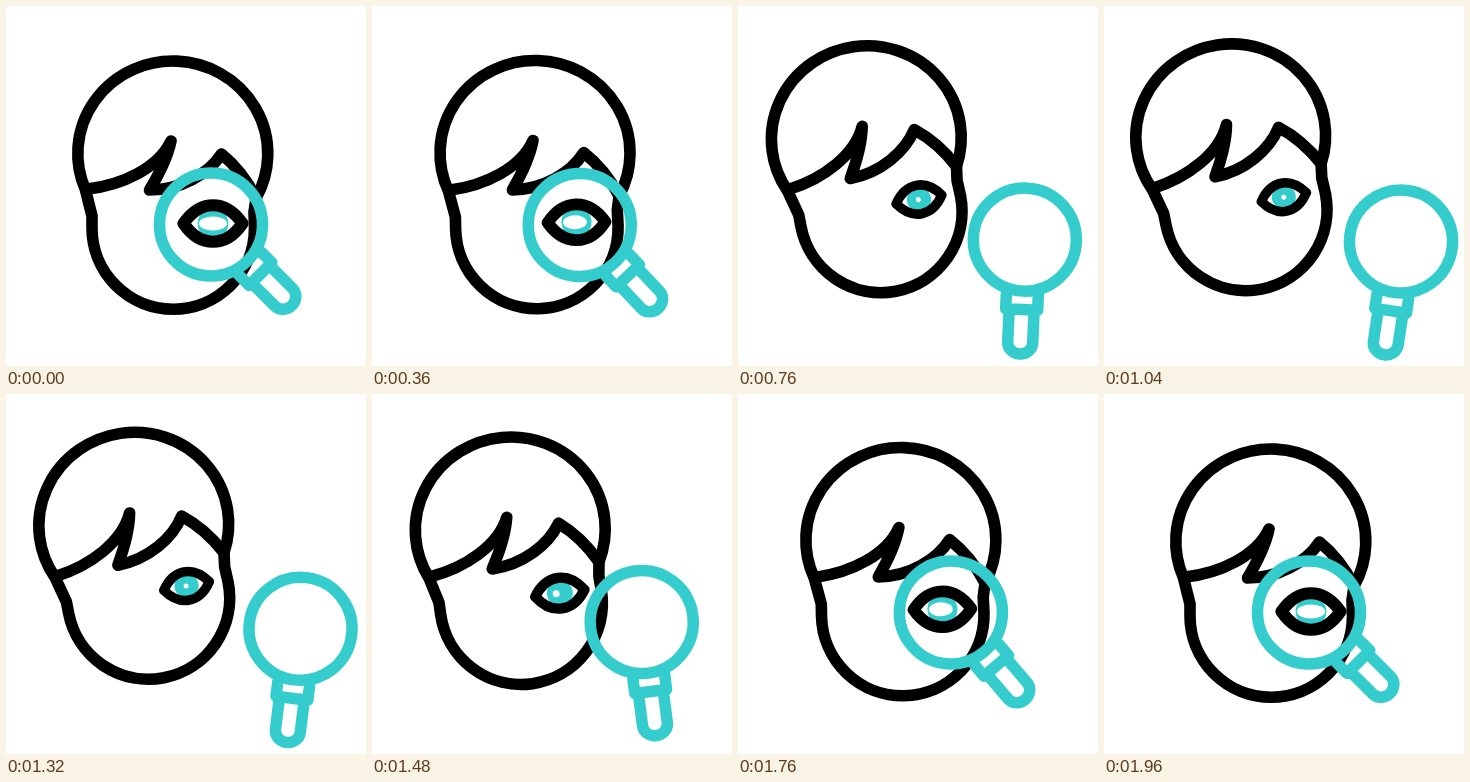
An HTML page for the animation above (2 s loop, 360 by 360 pixels).

```html
<!DOCTYPE html>
<html lang="en">
<head>
<meta charset="utf-8">
<title>Eye examination</title>
<style>
  html, body { margin: 0; height: 100%; overflow: hidden; background: #fff; }
  svg { display: block; width: 100vw; height: 100vh; fill: none; stroke-linecap: round; stroke-linejoin: round; }
  #head { stroke: #000; stroke-width: 11.6; }
  #lens { stroke: #34cccc; stroke-width: 11.5; }
</style>
</head>
<body>
<svg viewBox="0 0 360 360">
  <defs>
    <path id="lids" d="M-23 0C-10-19 10-19 23 0C10 19-10 19-23 0Z"/>
    <clipPath id="opening"><use href="#lids"/></clipPath>
  </defs>
  <g id="head">
    <path d="M-87 36A95 92.5 0 1 1 83.6 44L81.5 58L82 74A81.25 81.25 0 0 1-80.5 74V62Z"/>
    <path d="M-85 35C-50 31-14 14-1.5-13Q-6 8-23 36C8 36 36 20 49 0Q70 17 83.6 44"/>
    <g id="eye" stroke-width="9.5">
      <use href="#lids" fill="#fff" stroke="none"/>
      <g clip-path="url(#opening)" stroke="none">
        <circle r="12" fill="#34cccc"/>
        <ellipse id="glint" fill="#fff"/>
      </g>
      <use href="#lids"/>
    </g>
  </g>
  <g id="lens">
    <circle r="51.5"/>
    <path d="M-16 55V70H16V55M-12.5 70V103A12.5 11.5 0 0 0 12.5 103V70"/>
  </g>
</svg>
<script>
const LOOP = 2000, STEP = 40;
const $ = id => document.getElementById(id);
const set = (id, attrs) => {
  for (const name in attrs) $(id).setAttribute(name, attrs[name]);
};

const ease = (t, start, end) => {
  const u = Math.min(1, Math.max(0, (t - start) / (end - start)));
  return u * u * (3 - 2 * u);
};

// 0 at rest, 1 when swung fully aside
const swing = (t, leave, arrive, back, home) => ease(t, leave, arrive) - ease(t, back, home);
const mix = (a, b, u) => a + (b - a) * u;

function draw() {
  const t = Math.floor(performance.now() % LOOP / STEP) * STEP;
  const turn = swing(t, 250, 830, 1260, 1880);
  const slide = swing(t, 300, 880, 1260, 1870);
  const drop = swing(t, 300, 880, 1260, 1740);

  const headX = mix(166.5, 126.5, turn), headY = mix(148, 131, slide);
  set('head', { transform: `translate(${headX} ${headY}) rotate(${mix(0, -11.3, turn)})` });

  const lensX = mix(205, 297, slide), lensY = mix(218.5, 235.5, drop);
  set('lens', { transform: `translate(${lensX} ${lensY}) rotate(${mix(-45, 8.5, slide)})` });

  const zoom = mix(1.28, 1, turn), glint = mix(2.5, 14, (1 - turn) ** 2);
  set('eye', { transform: `translate(40.5 69.5) scale(${zoom})` });
  set('glint', {
    cx: -18 * turn * (1 - turn) / zoom,
    rx: glint / zoom,
    ry: Math.min(glint, 7) / zoom
  });
  requestAnimationFrame(draw);
}
draw();
</script>
</body>
</html>
```
